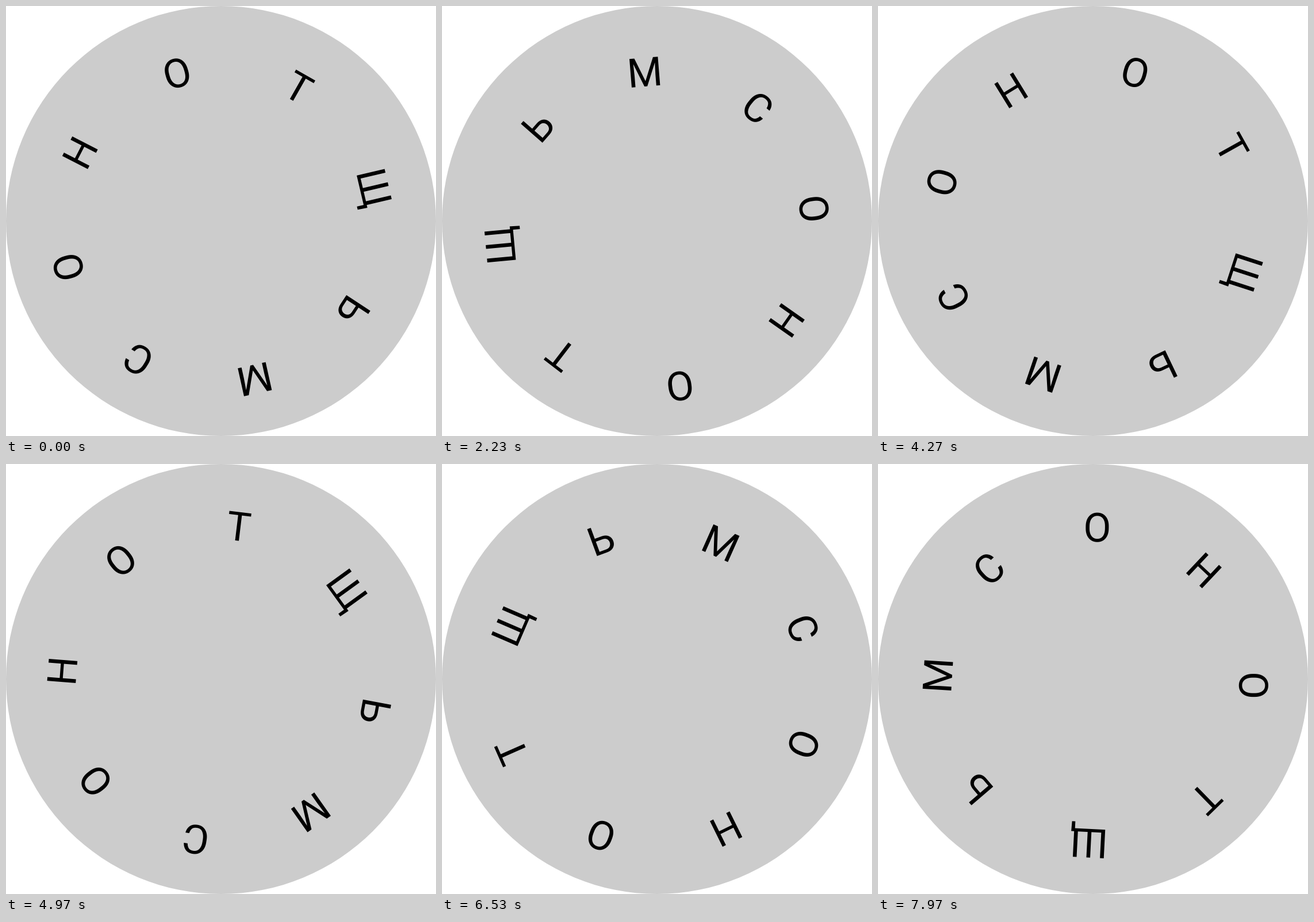
An HTML page with a canvas that plays this animation: 748x748 px, repeating every 8 s.

```html
<!DOCTYPE html>
<html lang="ru">
<head>
<meta charset="utf-8">
<title>Буквы по кругу</title>
<style>
  html, body { margin: 0; width: 100%; height: 100%; overflow: hidden; background: #fff; }
  canvas { display: block; }
</style>
</head>
<body>
<canvas id="stage" width="748" height="748"></canvas>
<script>
const ctx = document.getElementById('stage').getContext('2d');

const LOOP = 8000;
const STEPS = 240;
const START_ANGLE = 257.1;
const STEP_ANGLE = -2.5686;
const PIVOT = { x: 374.3, y: 384.8 };
const RING_SHIFT = 4.2;       // the ring sits slightly off its pivot
const BASELINE_RADIUS = 250;

// Each letter with its angle on the ring, clockwise from the top
const letters = [
  ['О', -2.5], ['Н', 40.1], ['О', 86.9], ['Т', 132.5],
  ['Щ', 179.7], ['Ь', 226.2], ['М', 270.4], ['С', 314.5],
];

const radians = degrees => degrees * Math.PI / 180;

function drawLetter(char, angle) {
  const ink = ctx.measureText(char);
  const inkCenter = (ink.actualBoundingBoxRight - ink.actualBoundingBoxLeft) / 2;
  ctx.save();
  ctx.rotate(radians(angle));
  ctx.fillText(char, -inkCenter, -BASELINE_RADIUS);
  ctx.restore();
}

function draw(time) {
  // 30 steps per second, with step times rounded to 10 ms
  const step = Math.min(STEPS - 1, Math.floor((time % LOOP + 4) * STEPS / LOOP));

  ctx.clearRect(0, 0, 748, 748);
  ctx.fillStyle = '#ccc';
  ctx.beginPath();
  ctx.arc(374, 374, 374, 0, 2 * Math.PI);
  ctx.fill();

  ctx.save();
  ctx.translate(PIVOT.x, PIVOT.y);
  ctx.rotate(radians(START_ANGLE + STEP_ANGLE * step));
  ctx.translate(RING_SHIFT, 0);
  ctx.font = '70px Roboto, sans-serif';
  ctx.fillStyle = '#000';
  for (const [char, angle] of letters) drawLetter(char, angle);
  ctx.restore();
}

const start = performance.now();
function tick() {
  draw(performance.now() - start);
  requestAnimationFrame(tick);
}
tick();
</script>
</body>
</html>
```
